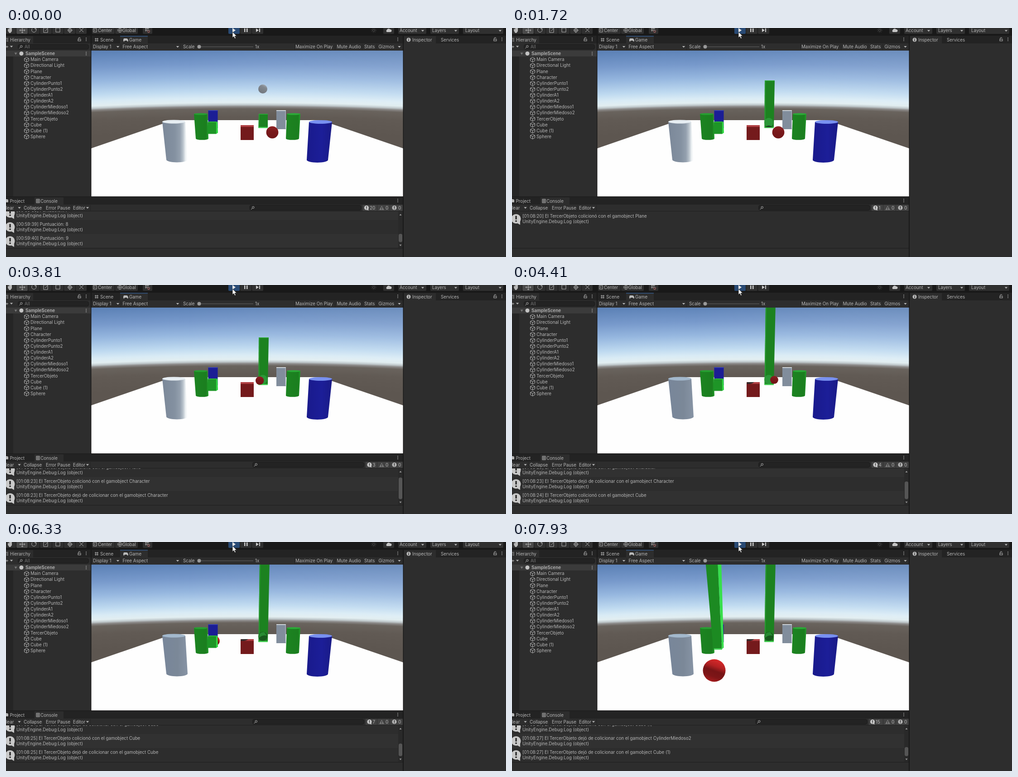
These frames come from a looping animation (1104 by 507 pixels, 8000 ms). An HTML page:

```html
<!DOCTYPE html>
<html lang="es">
<head>
<meta charset="utf-8">
<title>Game editor</title>
<style>
html, body { margin: 0; width: 100%; height: 100%; overflow: hidden; background: #191919; }
svg { display: block; }
text { font: 9.8px Inter, "Liberation Sans", sans-serif; fill: #b6b6b6; white-space: pre; }
.log text { font-size: 9.73px; }
.icon { fill: none; stroke: #b4b4b4; stroke-width: 1; }
</style>
</head>
<body>
<svg id="stage" width="1104" height="507" viewBox="0 0 1104 507"></svg>
<script>
const LOOP = 8000;
const BG = '#2d2d2d', BAR = '#232323', GAP = '#191919', LIGHT = '#b8b8b8';

const rect = (x, y, w, h, fill, more = '') => `<rect x="${x}" y="${y}" width="${w}" height="${h}" fill="${fill}" ${more}/>`;
const text = (x, y, s, more = '') => `<text x="${x}" y="${y}" ${more}>${s}</text>`;
const path = (d, fill, more = '') => `<path d="${d}" fill="${fill}" ${more}/>`;
const line = (d, more = '') => `<path class="icon" d="${d}" ${more}/>`;
const disc = (x, y, r, fill, more = '') => `<circle cx="${x}" cy="${y}" r="${r}" fill="${fill}" ${more}/>`;
const poly = (pts, fill) => `<polygon points="${pts}" fill="${fill}"/>`;
const group = (id, body = '', more = '') => `<g id="${id}" ${more}>${body}</g>`;
const arrow = (x, y) => path(`M${x - 3.2} ${y - 1.5}h6.4l-3.2 3.6z`, LIGHT);
const dots = (x, y) => [-3, 0, 3].map(d => rect(x - .7, y + d - .7, 1.5, 1.5, LIGHT)).join('');
const lock = (x, y) => line(`M${x - 2} ${y}v-2a2 2 0 0 1 4 0`) + rect(x - 3, y, 6, 3.6, 'none', `stroke="${LIGHT}"`);
const lens = (x, y) => line(`M${x - 1} ${y + 1}l-3 3`) + `<circle class="icon" cx="${x + .8}" cy="${y - .8}" r="2.2"/>`;
const cubeIcon = (x, y) => line(`M${x} ${y - 5}l5 2.6v5.2l-5 2.6l-5-2.6v-5.2zM${x - 5} ${y - 2.4}l5 2.5l5-2.5M${x} ${y}v5.4`);
const bang = (x, y, k) => rect(x - k * .13, y - k * .55, k * .26, k * .65, '#222') + rect(x - k * .13, y + k * .28, k * .26, k * .26, '#222');
const bubble = (x, y, r) => disc(x, y, r, '#c9c9c9') + path(`M${x + r * .15} ${y + r * .85}l${r * .7} ${r * .4}v${-r * .75}z`, '#c9c9c9') + bang(x, y, r * 1.15);

function toolbar() {
  let s = rect(0, 0, 1104, 17, GAP);
  for (const [x, w] of [[0, 22], [23, 25], [49, 25], [75, 26], [102, 25], [128, 25], [154, 24], [190, 50], [241, 50],
    [302, 21], [517, 25], [543, 25], [833, 24], [866, 62], [937, 63], [1009, 89]])
    s += rect(x, -3, w, 16, x === 23 ? '#4a4a4a' : '#303030', 'rx="2"');
  s += rect(491, -3, 25, 16, '#294a74', 'rx="2"');
  s += path('M5 0l2 4l0-5h6v8l-3 4h-3l-3-5z', LIGHT);
  s += line('M30 5h12M36 -1v12M32 3l-2 2l2 2M40 3l2 2l-2 2M34 9l2 2l2-2');
  s += line('M58 1a5 5 0 1 0 6-1M64 -2v4h4');
  s += line('M83 0h9v10h-9zM86 7l5-5') + line('M110 0h9v9h-9z');
  s += line('M141 0v11M136 5h11M137 5a4 4 0 1 0 8 0a4 4 0 1 0-8 0') + line('M162 0l9 9M171 0l-9 9', 'stroke-width="2"');
  s += line('M193 1h7v8h-7zM196 3v4') + disc(251.5, 5, 4.5, 'none', 'class="icon"') + line('M247 5h9M251.5 .5v9');
  s += line('M307 1h9M307 5h9M309 -1v9M313 -1v4') + line('M313 5v3a2 2 0 0 0 4 0v-3', 'style="stroke:#c77"');
  s += text(203, 9, 'Center') + text(257, 9, 'Global');
  s += path('M500 0l7 5l-7 5z', '#e4e4e4') + rect(526, 1, 2.5, 8, '#ccc') + rect(531, 1, 2.5, 8, '#ccc');
  s += path('M552 1l6 4l-6 4z', '#ccc') + rect(559, 1, 2, 8, '#ccc');
  s += disc(812, 5, 2.5, 'none', 'stroke="#555"') + disc(812, 5, 5, 'none', 'stroke="#555" stroke-dasharray="1.5 2.4"');
  s += path('M841 9a3 3 0 0 1 0-5a4.2 4.2 0 0 1 7-1a3 3 0 0 1 1 6z', '#c4c4c4');
  s += text(869, 9, 'Account') + text(941, 9, 'Layers') + text(1014, 9, 'Layout');
  return s + arrow(920, 6) + arrow(993, 6) + arrow(1091, 6);
}

function hierarchy() {
  let s = rect(0, 17, 187, 356, BG) + rect(0, 17, 187, 17, BAR) + rect(0, 18, 60, 16, BG);
  s += line('M0 23h5M1 26h4M1 29h4') + text(9, 29.5, 'Hierarchy') + lock(162, 25) + dots(177, 25);
  s += line('M0 41.5h5M2 39v5') + arrow(12, 41);
  s += rect(26.5, 36.5, 156, 10.5, '#232323', 'rx="4" stroke="#1a1a1a"') + lens(33, 41.5) + text(41, 44.8, 'All', 'style="fill:#757575"');
  s += rect(0, 50, 16, 323, '#252525') + rect(0, 50, 187, 13, '#3b3b3b');
  s += path('M18.5 54.5h6l-3 5z', '#777') + disc(34, 56.5, 4.5, '#c4c4c4');
  s += text(43, 60, 'SampleScene', 'style="font-weight:600"') + dots(177, 56.5);
  ['Main Camera', 'Directional Light', 'Plane', 'Character', 'CylinderPunto1', 'CylinderPunto2', 'CylinderA1', 'CylinderA2',
    'CylinderMiedoso1', 'CylinderMiedoso2', 'TercerObjeto', 'Cube', 'Cube (1)', 'Sphere'].forEach((name, i) => {
    const y = 69.8 + 13.12 * i;
    s += cubeIcon(45.5, y) + text(54, y + 3.5, name);
  });
  return s;
}

function gameBar() {
  let s = rect(189, 17, 687, 33, BG) + rect(189, 17, 687, 17, BAR);
  s += rect(252, 18, 61, 16, BG) + rect(252, 17.5, 61, 1.3, '#355f96');
  s += line('M196 24h8M196 28h8M198 22v8M202 22v8') + text(208, 29.5, 'Scene');
  s += path('M259 28c0-5 1-5 4-5s6-1 7 5c0 3-3 2-3 0h-5c0 2-3 3-3 0z', LIGHT) + text(272, 29.5, 'Game') + dots(865, 25);
  for (const x of [253, 385, 637, 726, 786, 818]) s += rect(x, 35, 1, 14, '#242424');
  s += text(192, 45, 'Display 1') + arrow(247, 41.5) + text(257.5, 45, 'Free Aspect') + arrow(379, 41.5);
  s += text(391, 45, 'Scale') + rect(424, 41, 122, 1.2, '#5c5c5c') + disc(426.5, 41.5, 4, '#9a9a9a') + text(550, 45, '1x');
  s += text(639, 45, 'Maximize On Play') + text(730.5, 45, 'Mute Audio') + text(791, 45, 'Stats') + text(822.5, 45, 'Gizmos');
  return s + arrow(868.5, 41.5);
}

function inspector() {
  return rect(878, 17, 226, 490, BG) + rect(878, 17, 226, 17, BAR) + rect(879, 18, 70, 16, BG) +
    disc(889, 26, 4.5, LIGHT) + rect(888.3, 25, 1.5, 4, BG) + rect(888.3, 22.8, 1.5, 1.3, BG) +
    text(897, 29.5, 'Inspector') + text(960, 29.5, 'Services') + lock(1080, 25) + dots(1095, 25);
}

function consoleFrame() {
  let s = rect(0, 374, 876, 133, BG) + rect(0, 374, 876, 17, BAR) + rect(63, 375, 64, 16, BG);
  s += text(8.5, 386.5, 'Project') + path('M0 379h3l1 1h1v6h-5z', LIGHT) + text(76, 386.5, 'Console');
  s += line('M67 379h7v8h-7zM68 381h5M68 383h5M68 385h5') + dots(865, 382);
  s += text(0, 402, 'lear') + arrow(29.5, 398) + text(39, 402, 'Collapse') + text(88, 402, 'Error Pause');
  s += text(148, 402, 'Editor') + arrow(180, 398);
  for (const x of [36, 83, 144, 186]) s += rect(x, 392, 1, 13, '#242424');
  return s + rect(0, 405, 876, 1, '#202020');
}

// Upright solid seen from above: top edge from l to r at y, foot from bl to br at by.
function cylinder(l, r, y, bl, br, by, body, cap, ry) {
  const rt = (r - l) / 2, rb = (br - bl) / 2;
  return path(`M${l} ${y}L${bl} ${by}A${rb} ${ry * 1.5} 0 0 0 ${br} ${by}L${r} ${y}z`, body) +
    `<ellipse cx="${(l + r) / 2}" cy="${y}" rx="${rt}" ry="${ry}" fill="${cap}"/>`;
}

const R = 7400, RIM = R + 130;
const skyStops = [[-60, '#5d5650'], [-25, '#615a54'], [-7, '#69635d'], [-2, '#8a8887'], [2, '#c0c9cc'], [7, '#e2eef1'],
  [17, '#d9ebf5'], [32, '#bfdaf0'], [62, '#96b7df'], [92, '#7799cb'], [122, '#6085b9'], [130, '#5c80b4']];
const stops = list => list.map(([o, c]) => `<stop offset="${o}" stop-color="${c}"/>`).join('');

const defs = `<defs>
<clipPath id="view"><rect x="188.5" y="50" width="688" height="322.7"/></clipPath>
<clipPath id="list"><rect x="0" y="406" width="876" height="81"/></clipPath>
<radialGradient id="sky" gradientUnits="userSpaceOnUse" cx="532" cy="${172 + R}" r="${RIM}">${stops(skyStops.map(([d, c]) => [(R + d) / RIM, c]))}</radialGradient>
<linearGradient id="haze">${stops([[0, '#fff0'], [.3, '#fff0'], [1, '#ffffff1c']])}</linearGradient>
<linearGradient id="lit">${stops([[0, '#7b8899'], [.5, '#8491a1'], [.7, '#94a0ae'], [.82, '#b9c3cc'], [.92, '#eef2f4'], [1, '#fff']])}</linearGradient>
<linearGradient id="shade">${stops([[0, '#78869a'], [.6, '#7b8898'], [1, '#8794a5']])}</linearGradient>
<linearGradient id="blue">${stops([[0, '#191a8c'], [.6, '#1c1e98'], [1, '#1a1b86']])}</linearGradient>
<linearGradient id="green">${stops([[0, '#1c8421'], [.85, '#1b7e1f'], [1, '#22a12c']])}</linearGradient>
<linearGradient id="grey" x1=".8" y1="0" x2=".3" y2="1">${stops([[0, '#a9b0b8'], [.3, '#82888f'], [1, '#71767d']])}</linearGradient>
<linearGradient id="dim" x1=".5" y1="0" x2=".4" y2="1">${stops([[0, '#8f2224'], [.4, '#7a191b'], [1, '#701517']])}</linearGradient>
<linearGradient id="bright" x1=".7" y1="0" x2=".35" y2="1">${stops([[0, '#dc2a2b'], [.32, '#b32022'], [.52, '#761416'], [.75, '#7e1517'], [1, '#a81b1d']])}</linearGradient>
</defs>`;

const scene = rect(188, 50, 689, 323, 'url(#sky)') + rect(188, 50, 689, 118, 'url(#haze)') +
  poly('369,204 695,204 877,266.500 877,373 188,373 188,266.500', '#fefefe') +
  rect(446.5, 182, 21, 40, '#1b1d95') + rect(446.5, 182, 21, 1.5, '#3c45b8') +
  rect(597, 182, 21, 42, '#818d9c') + rect(597, 182, 21, 1.5, '#e9eef2') + rect(616.5, 183, 1.5, 40, '#a7b2bf') +
  group('pillar') + group('drop') +
  '<circle id="back"/>' +
  cylinder(415, 445, 190.5, 419, 447, 244.8, 'url(#green)', '#27a032', 2) +
  group('cubeOne') +
  rect(518, 215, 29, 5, '#b04144') + rect(518, 219, 29, 29, '#741a1c') +
  group('patch', poly('518,219 519,215 535,215 530,218 525,219', '#332a2b')) +
  cylinder(620, 650, 190.5, 618, 647, 244.8, 'url(#green)', '#2cab38', 2) +
  group('pale') +
  cylinder(669, 720, 208, 664, 711, 292, 'url(#blue)', '#7890f0', 4) +
  '<circle id="front"/>';

document.getElementById('stage').innerHTML = defs + rect(0, 0, 1104, 507, GAP) + hierarchy() + gameBar() + inspector() +
  consoleFrame() + group('scene', scene, 'clip-path="url(#view)"') + group('tools') + group('rows', '', 'class="log" clip-path="url(#list)"') +
  rect(0, 487, 876, 1, '#1e1e1e') + toolbar() +
  path('M500 8.5v13l3-2.8l2.2 4.8l2.2-1l-2.2-4.6h4.2z', '#fff', 'stroke="#111" stroke-width=".8"');

const el = id => document.getElementById(id);

// Time, second, kind and partner of each collision.
const hits = [[900, 20, 1, 'Plane'], [2910, 23, 1, 'Character'], [3010, 23, 0, 'Character'], [4310, 24, 1, 'Cube'],
  [4810, 24, 0, 'Cube'], [5030, 25, 1, 'Cube'], [5530, 25, 0, 'Cube'], [6430, 26, 1, 'Cube (1)'], [6630, 26, 1, 'CylinderMiedoso2'],
  [6930, 26, 0, 'Cube (1)'], [7030, 27, 0, 'CylinderMiedoso2'], [7130, 27, 1, 'CylinderMiedoso2'], [7230, 27, 1, 'Cube (1)'],
  [7430, 27, 0, 'CylinderMiedoso2'], [7530, 27, 0, 'Cube (1)']];
const message = ([, sec, enter, name]) => `[01:08:${sec}] El TercerObjeto ${enter ? 'colicionó' : 'dejó de colicionar'} con el gamobject ${name}`;
const oldLog = i => `[00:59:${21 + i}] Puntuación: ${i - 10}`;

function drawConsole(n, old) {
  const scroll = n * 31 > 80, width = scroll ? 866 : 876;
  let s = '';
  for (let i = Math.max(0, n - 3); i < n; i++) {
    const y = scroll ? 487 - 31 * (n - i) : 407 + 31 * i;
    s += rect(0, y, width, 31, i % 2 ? '#313131' : BG) + bubble(9, y + 15.5, 10.5);
    s += text(23, y + 12.5, old ? oldLog(i) : message(hits[i])) + text(23, y + 24.7, 'UnityEngine.Debug:Log (object)');
  }
  if (scroll) {
    const h = 13 + 104 / n;
    s += rect(866, 406, 10, 81, '#292929') + rect(867, 474 - h, 8, h, '#555', 'rx="3.5"');
    s += path('M868.5 415l2.5-3.5l2.5 3.5zM868.5 479.5l2.5 3.5l2.5-3.5z', '#999');
  }
  el('rows').innerHTML = s;
  const x = n > 9 ? 538 : 544.5, toggle = '#414141';
  el('tools').innerHTML = rect(x, 392.5, 246, 11, '#232323', 'rx="4" stroke="#1a1a1a"') + lens(x + 7, 398) +
    rect(x + 249.5, 391.5, 569.5 - x, 13.5, toggle) + rect(820, 391.5, 27, 13.5, toggle) + rect(848, 391.5, 28, 13.5, toggle) +
    bubble(x + 258, 398, 5) + text(x + 265, 402, n) +
    path('M829.5 393.5l5.5 9.5h-11z', '#777') + bang(829.5, 399.5, 5) + text(838, 402, '0') +
    disc(857.5, 398, 5, '#b4b4b4') + bang(857.5, 398, 6) + text(866, 402, '0');
}

function drawPillar(stage) {
  const top = [190, 116, 40][stage], right = 578 + 2 * stage;
  const left = stage === 2 ? 560 : 558, foot = 557.5;
  el('pillar').innerHTML = poly(`${left},${top} ${right},${top} 578,221 ${foot},221`, '#1c8220') +
    poly(`${left},${top} ${left + 2},${top + 1} ${foot + 2},219 ${foot},221`, '#2a9c34') +
    rect(left, top, right - left, 1.5, '#2fae3b') + rect(foot, 219, 20.5, 2.5, '#3ccb4c');
}

function drawShadows(tall) {
  el('patch').style.display = tall ? '' : 'none';
  el('pale').innerHTML = cylinder(345, 396, 207.5, 354, 401, 291.5, tall ? 'url(#shade)' : 'url(#lit)', tall ? '#a3b8cc' : '#e6edf2', 4);
}

function drawCubeOne(tall) {
  el('cubeOne').innerHTML = tall
    ? poly('427,40 454,40 463.5,237 444.5,238', '#1c8a22') + poly('454,40 462,40 467.5,234 463.5,237', '#37df4b') + rect(446, 235.5, 18, 3, '#49d75a')
    : poly('446,209 448,207 467,207 464,209', '#2fb53b') + rect(445.5, 209, 19, 25.5, '#1e9527') + poly('464,209 467,207.5 468,232 464,234.5', '#31d843');
}

// Redraws a part only when its state differs from the last one shown.
const shown = {};
function set(name, draw, ...state) {
  const key = state.join();
  if (shown[name] === key) return;
  shown[name] = key;
  draw(...state);
}

// The red ball rolls on the floor: x and y on the stage at some times.
const route = [[2450, 588, 231], [3010, 541, 221], [3210, 544, 213], [3410, 544, 213], [4310, 579, 210], [4500, 579, 210], [5030, 556, 210],
  [5330, 530, 208], [5530, 528, 208], [6330, 461, 219], [6900, 461, 219], [7330, 482, 226], [7730, 464, 255], [7930, 446.5, 284.5]];
const HORIZON = 169, MID = 532;
function rolling(t) {
  const i = route.findIndex(k => k[0] > t);
  if (i === 0) return route[0].slice(1);
  if (i < 0) return route.at(-1).slice(1);
  const [t0, x0, y0] = route[i - 1], [t1, x1, y1] = route[i], p = (t - t0) / (t1 - t0);
  const mix = (a, b) => a + (b - a) * p;
  const depth = mix(1 / (y0 - HORIZON), 1 / (y1 - HORIZON));
  const side = mix((x0 - MID) / (y0 - HORIZON), (x1 - MID) / (y1 - HORIZON));
  return [MID + side / depth, HORIZON + 1 / depth];
}

// The falling ball takes the pillar's colour; shade is 'foot', 'none' or 'full'.
function drawDrop(y, green, shade) {
  let s = disc(567, y, 10, !green ? 'url(#grey)' : shade === 'full' ? '#17591d' : '#2b9738');
  if (shade === 'full') s += path('M558 213.5q7-9 18-6l-6-8q-11 0-12 9z', '#278b32');
  if (shade === 'foot' && y > 208) s += path('M558.5 219.5q8.5-7 17 0z', '#1c3c20');
  el('drop').innerHTML = s;
}

function render(t) {
  const old = t < 100;
  set('console', drawConsole, old ? 20 : hits.filter(h => h[0] <= t).length, old);
  set('pillar', drawPillar, t < 720 ? 0 : t < 4310 ? 1 : 2);
  set('shadows', drawShadows, t >= 4310);
  set('cubeOne', drawCubeOne, t >= 6430);
  const fall = Math.min(1, Math.max(0, (t - 60) / 840));
  set('drop', drawDrop, +(135 + 74 * fall * fall).toFixed(2), t >= 720, t < 2520 ? 'foot' : t < 4510 ? 'none' : 'full');
  const [x, y] = rolling(t), near = t < 2800 || t >= 7330;
  for (const id of ['back', 'front']) {
    const c = el(id);
    c.setAttribute('cx', x);
    c.setAttribute('cy', y);
    c.setAttribute('r', (y - HORIZON) / 4.62);
    c.setAttribute('fill', t < 5530 ? 'url(#dim)' : 'url(#bright)');
    c.style.display = (id === 'front') === near ? '' : 'none';
  }
}

const start = performance.now();
function tick() {
  render((performance.now() - start) % LOOP);
  requestAnimationFrame(tick);
}
render(0);
requestAnimationFrame(tick);
</script>
</body>
</html>
```
